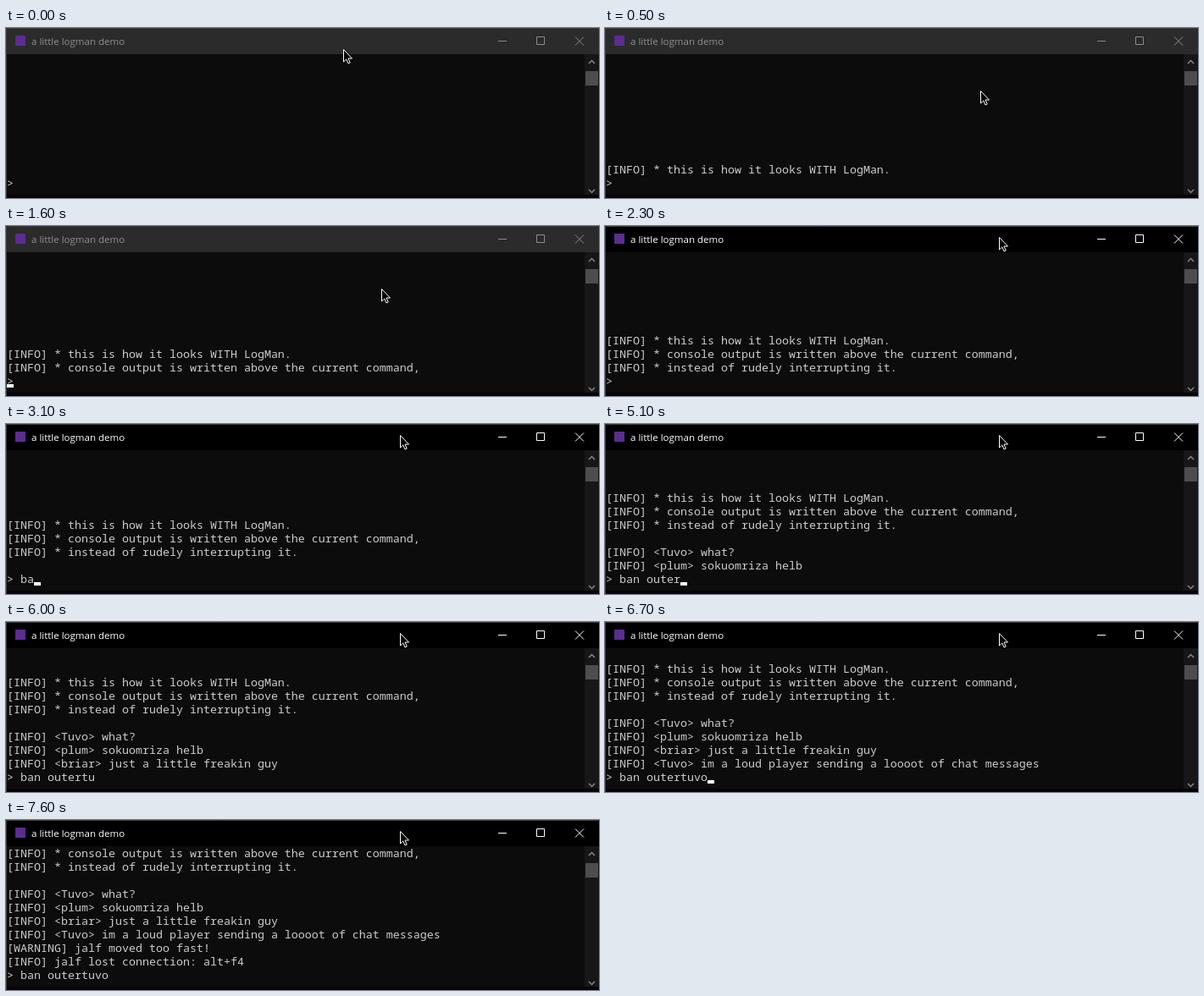
Animation, 700 px wide and 201 px high, one loop 8 s. Source, as an HTML page:

```html
<!DOCTYPE html>
<html lang="en">
<head>
<meta charset="utf-8">
<title>a little logman demo</title>
<style>
html, body { margin: 0; width: 100%; height: 100%; overflow: hidden; background: #0c0c0c; }
#stage { position: absolute; left: 0; top: 0; width: 700px; height: 201px; overflow: hidden; background: #0c0c0c; }
svg { position: absolute; left: 0; top: 0; }
#bar { fill: #2b2b2b; }
#title { font: 11.5px "Open Sans", sans-serif; fill: #8f8f8f; }
#buttons { fill: none; stroke: #8a8a8a; }
.focused #bar { fill: #000; }
.focused #title { fill: #fff; }
.focused #buttons { stroke: #fff; }
pre { position: absolute; left: 1px; top: 31px; margin: 0; color: #ccc;
  font: 13.333px/16px "Noto Sans Mono", monospace; font-variant-ligatures: none; }
#caret { position: absolute; top: 187px; width: 8px; height: 4px; background: #fff; }
</style>
</head>
<body>
<div id="stage">
  <svg width="700" height="201">
    <rect id="bar" width="700" height="31"/>
    <rect y="197" width="700" height="4" fill="#0a0204"/>
    <path d="M.5 201V.5H700" fill="none" stroke="#3a3a3a"/>
    <rect x="11" y="9" width="12" height="12" fill="#5b2d90"/>
    <text id="title" x="30" y="20">a little logman demo</text>
    <path id="buttons" d="M581 15.5h10M626.5 10.5h9v9h-9zM672 10.5l10 10M682 10.5l-10 10"/>
    <rect x="683" y="31" width="17" height="166" fill="#171717"/>
    <rect x="684" y="51" width="15" height="17" fill="#4d4d4d"/>
    <path d="M688 42l3.5-3.500 3.500 3.500M688 191l3.500 3.500 3.500-3.500" fill="none" stroke="#868686" stroke-width="1.500"/>
  </svg>
  <pre id="screen"></pre>
  <div id="caret"></div>
  <svg width="700" height="201">
    <path id="mouse" d="M.5.5V15L3.800 11.900 6 17 8.200 16 6 11H10.500Z" fill="#000" stroke="#fff"/>
  </svg>
</div>
<script>
const LOOP = 8000, ROWS = 10;
const messages = [
  [200, "[INFO] * this is how it looks WITH LogMan."],
  [900, "[INFO] * console output is written above the current command,"],
  [1700, "[INFO] * instead of rudely interrupting it."],
  [3100, ""],
  [3900, "[INFO] <Tuvo> what?"],
  [4600, "[INFO] <plum> sokuomriza helb"],
  [5300, "[INFO] <briar> just a little freakin guy"],
  [6100, "[INFO] <Tuvo> im a loud player sending a loooot of chat messages"],
  [6800, "[WARNING] jalf moved too fast!"],
  [7500, "[INFO] jalf lost connection: alt+f4"]
];
const command = "ban outertuvo";
const keyTimes = [2600, 2900, 3300, 3500, 3700, 4000, 4300, 4700, 5100, 5500, 6000, 6300, 6700];
const caretToggles = [2600, 3400, 3500, 4500, 4600, 5000, 5100, 6000, 6100, 6600, 6700, 7100, 7500, 7600];
const mousePath = [
  [0, 398, 25], [100, 428, 70], [200, 440, 86], [400, 441, 80], [500, 443, 74],
  [2100, 452, 50], [2200, 461, 24], [2300, 465, 13]
];
const [stage, screenText, caret, mouse] =
  ["stage", "screen", "caret", "mouse"].map(id => document.getElementById(id));

const countPast = (times, t) => times.filter(time => time <= t).length;
const within = (t, from) => t >= from && t < from + 100;

function draw(t) {
  const typed = countPast(keyTimes, t);
  const lines = messages.filter(([time]) => time <= t).map(([, text]) => text);
  // The first message briefly covers the prompt before it is redrawn.
  lines.push(within(t, 100) ? messages[0][1] : "> " + command.slice(0, typed));
  while (lines.length < ROWS) lines.unshift("");
  screenText.textContent = "\n" + lines.slice(-ROWS).join("\n");
  screenText.firstChild.deleteData(0, 1);

  // The caret returns to the line start while output is being written.
  const rewinding = within(t, 1600) || within(t, 3800);
  const visible = rewinding || countPast(caretToggles, t) % 2;
  caret.style.display = visible ? "block" : "none";
  caret.style.left = 1 + 8 * (rewinding ? 0 : typed + 2) + "px";

  const [, x, y] = mousePath.findLast(([time]) => time <= t);
  mouse.setAttribute("transform", `translate(${x} ${y})`);
  stage.classList.toggle("focused", t >= 2300);
}

function tick() {
  draw(performance.now() % LOOP);
  requestAnimationFrame(tick);
}
tick();
</script>
</body>
</html>
```
